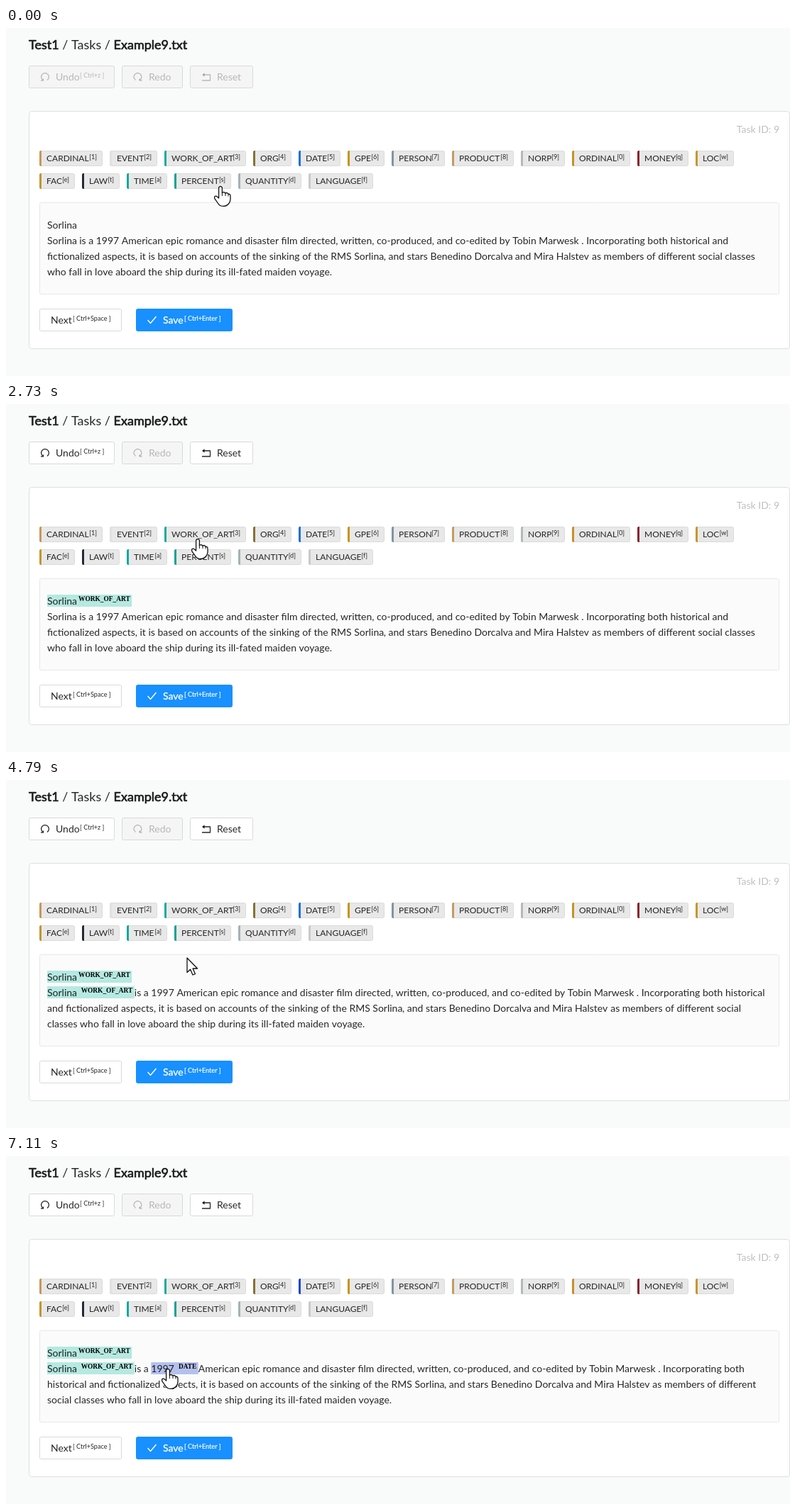
These frames come from a looping animation (1104 px wide and 491 px high, 7310 ms). An HTML page with a canvas:

```html
<!DOCTYPE html>
<html lang="en">
<head>
<meta charset="utf-8">
<title>Text annotation</title>
<style>
html, body { margin: 0; width: 100%; height: 100%; overflow: hidden; background: #f9fbfa; }
canvas { display: block; }
</style>
</head>
<body>
<canvas id="stage" width="1104" height="491"></canvas>
<script>
const ctx = document.getElementById('stage').getContext('2d');
const LOOP = 7310, FADE = 300;
const LATO = 'Lato, sans-serif';
const BODY = '14px ' + LATO, SUP = '9.1px ' + LATO;
const LABEL = 'bold 9.38px "Liberation Serif", serif';
const INK = 'rgba(0,0,0,.85)', FAINT = 'rgba(0,0,0,.25)', BLUE = '#1890ff';

// name, hotkey, box width, stripe colour
const TAGS = [[
  ['CARDINAL', '1', 89, '#c8975a'], ['EVENT', '2', 67, '#e0e2e1'],
  ['WORK_OF_ART', '3', 115, '#13ada0'], ['ORG', '4', 54, '#8a6f35'],
  ['DATE', '5', 59, '#1a72d2'], ['GPE', '6', 52, '#c49520'],
  ['PERSON', '7', 75, '#7f95a5'], ['PRODUCT', '8', 87, '#c69a60'],
  ['NORP', '9', 62, '#b3b9b7'], ['ORDINAL', '0', 82, '#c99127'],
  ['MONEY', 'q', 72, '#8c2430'], ['LOC', 'w', 54, '#c9972e']
], [
  ['FAC', 'e', 50, '#c3952e'], ['LAW', 't', 53, '#262a33'],
  ['TIME', 'a', 57, '#12a89f'], ['PERCENT', 's', 80, '#12a294'],
  ['QUANTITY', 'd', 89, '#9fb4b5'], ['LANGUAGE', 'f', 91, '#c5cbc8']
]];
const tagBoxes = TAGS.flatMap((row, r) => {
  let x = 47;
  return row.map(([name, key, w, color]) => {
    const box = { name, key, color, x, y: 173 + 32 * r, w, h: 22 };
    x += w + 10;
    return box;
  });
});

// each annotation: tag click, text selection, mark placed
const STEPS = [
  { tag: 'WORK_OF_ART', click: 700, select: 1840, mark: 1990, fill: '#b5e9e1' },
  { tag: 'WORK_OF_ART', click: 2960, select: 4030, mark: 4130, fill: '#b5e9e1' },
  { tag: 'DATE', click: 5200, select: 6250, mark: 6380, fill: '#b4c1ee' }
];
const ACTIVE = { WORK_OF_ART: '#12bfa9', DATE: '#1f50d6' };

// name and the room it takes on the line
const NAMES = {
  title: ['Sorlina', 41.6],
  director: ['Tobin Marwesk', 97],
  lead: ['Benedino Dorcalva', 115.8],
  star: ['Mira Halstev', 78.4]
};
const STORY = ('{title} is a 1997 American epic romance and disaster film directed, written, ' +
  'co-produced, and co-edited by {director}. Incorporating both historical and fictionalized ' +
  'aspects, it is based on accounts of the sinking of the RMS {title}, and stars {lead} and ' +
  '{star} as members of different social classes who fall in love aboard the ship during its ' +
  'ill-fated maiden voyage.').split(' ');

// time, x, y
const PATH = [
  [0, 302, 223], [290, 302, 223], [580, 272, 178], [860, 272, 178], [970, 212, 212],
  [1010, 171, 232], [1400, 72, 282], [1720, 79, 281], [2380, 79, 281], [2590, 200, 232],
  [2730, 270, 190], [2800, 272, 186], [3080, 272, 186], [3300, 187, 256], [3600, 80, 296],
  [3720, 73, 300], [4580, 73, 300], [4830, 290, 240], [5060, 436, 186], [5330, 436, 186],
  [5580, 327, 256], [5950, 222, 300], [6100, 217, 299], [6850, 217, 299], [7080, 228, 300],
  [7310, 228, 300]
];

const clamp = v => Math.max(0, Math.min(1, v));
const inside = (p, b) => p.x >= b.x && p.x < b.x + b.w && p.y >= b.y && p.y < b.y + b.h;

function widthOf(str, font) {
  ctx.font = font;
  return ctx.measureText(str).width;
}

// bold thickens the regular face and keeps its advance widths
function text(str, x, y, font = BODY, color = INK, bold = 0) {
  const w = widthOf(str, font);
  ctx.fillStyle = color;
  ctx.fillText(str, x, y);
  if (bold) {
    ctx.strokeStyle = color;
    ctx.lineWidth = bold;
    ctx.lineJoin = 'round';
    ctx.strokeText(str, x, y);
  }
  return x + w;
}

function panel(x, y, w, h, r, fill, stroke) {
  ctx.beginPath();
  ctx.roundRect(x + .5, y + .5, w - 1, h - 1, r);
  ctx.fillStyle = fill;
  ctx.fill();
  ctx.strokeStyle = stroke;
  ctx.lineWidth = 1;
  ctx.stroke();
}

function line(points, color, width) {
  ctx.beginPath();
  points.forEach(([x, y]) => ctx.lineTo(x, y));
  ctx.strokeStyle = color;
  ctx.lineWidth = width;
  ctx.stroke();
}

function turnIcon(x, y, side, color) {
  ctx.beginPath();
  ctx.arc(x, y - .5, 5.4, Math.PI * .68, Math.PI * 2.32);
  ctx.strokeStyle = color;
  ctx.lineWidth = 1.3;
  ctx.stroke();
  line([[x + side * 6, y + 4.6], [x + side * 2.6, y + 4.6], [x + side * 2.6, y + 2]], color, 1.3);
}

function resetIcon(x, y, color) {
  line([[x - 4, y - 3.5], [x + 5.5, y - 3.5], [x + 5.5, y + 4.5], [x - 6, y + 4.5]], color, 1.3);
  ctx.beginPath();
  ctx.moveTo(x - 6, y - 3.5);
  ctx.lineTo(x - 2.5, y - 6.2);
  ctx.lineTo(x - 2.5, y - .8);
  ctx.fillStyle = color;
  ctx.fill();
}

function toolbar(t) {
  const on = clamp((t - STEPS[0].mark) / FADE);
  const v = Math.round(245 + 10 * on);
  const fill = `rgb(${v},${v},${v})`, color = `rgba(0,0,0,${.25 + .6 * on})`;
  panel(32, 53, 121, 32, 2, fill, '#d9d9d9');
  panel(163, 53, 86, 32, 2, '#f5f5f5', '#d9d9d9');
  panel(259, 53, 89, 32, 2, fill, '#d9d9d9');
  turnIcon(55, 69.5, -1, color);
  turnIcon(185.5, 69.5, 1, FAINT);
  resetIcon(282, 69.5, color);
  text('[ Ctrl+z ]', text('Undo', 70, 74, BODY, color) + .4, 70, SUP, color);
  text('Redo', 201, 74, BODY, FAINT);
  text('Reset', 297, 74, BODY, color);
}

function heading() {
  const font = '18px ' + LATO;
  let x = text('Test1', 32, 30, font, INK, .7);
  x = text(' / Tasks / ', x, 30, font);
  text('Example9.txt', x, 30, font, INK, .7);
}

function glow(box, color, u) {
  if (u <= 0 || u >= 1) return;
  ctx.save();
  ctx.globalAlpha = .6 * (1 - u ** 3);
  ctx.shadowColor = color;
  ctx.shadowBlur = 6 * Math.min(1, u * 4);
  ctx.fillStyle = color;
  ctx.beginPath();
  ctx.roundRect(box.x, box.y, box.w, box.h, 2);
  ctx.fill();
  ctx.restore();
}

function drawTag(box, t) {
  const { name, key, x, y, w, h } = box;
  const stripe = name === 'DATE' && t >= STEPS[2].click ? '#1c46ce' : box.color;
  let level = 0;
  for (const s of STEPS) {
    if (s.tag !== name) continue;
    level = Math.max(level, clamp((t - s.click) / FADE) * (1 - clamp((t - s.mark) / FADE)));
    glow(box, ACTIVE[name], (t - s.click) / 410);
  }
  panel(x, y, w, h, 2, '#e8e8e8', '#dbdbdb');
  ctx.fillStyle = stripe;
  ctx.beginPath();
  ctx.roundRect(x, y, 3, h, [2, 0, 0, 2]);
  ctx.fill();
  if (level) {
    ctx.globalAlpha = level;
    ctx.fillStyle = ACTIVE[name];
    ctx.beginPath();
    ctx.roundRect(x, y, w, h, 2);
    ctx.fill();
    ctx.globalAlpha = 1;
  }
  const v = Math.round(38 + 217 * level), color = `rgb(${v},${v},${v})`;
  const bold = level > .5 ? .5 : 0, hint = `[${key}]`;
  text(name, x + 10, y + 15, '12px ' + LATO, color, bold);
  text(hint, x + w - 8 - widthOf(hint, SUP), y + 11.5, SUP, color, bold / 2);
}

// draws one word, with its selection or mark; returns the right edge and the mark box
function drawWord(word, x, y, step, t, spaced) {
  const slot = /^\{(\w+)\}(.*)$/.exec(word);
  const [name, nameW] = slot ? NAMES[slot[1]] : ['', 0];
  const rest = slot ? slot[2] : word;
  const wordW = nameW + widthOf(rest, BODY);
  const tailW = wordW + (spaced ? widthOf(' ', BODY) : 0);
  const marked = step && t >= step.mark;
  const selected = step && !marked && t >= step.select;
  let box = null, end = x + wordW;
  if (marked) {
    end = x + tailW + 5 + widthOf(step.tag, LABEL);
    box = { x, y: y - 14, w: end - x, h: 17 };
    ctx.fillStyle = step.fill;
    ctx.fillRect(x, box.y, box.w, box.h);
    text(step.tag, x + tailW + 2.5, y - 5, LABEL, '#000');
  } else if (selected) {
    ctx.fillStyle = BLUE;
    ctx.fillRect(x, y - 16, tailW, 22);
  }
  const color = selected ? '#fff' : INK;
  if (name) text(name, x, y, BODY, color);
  if (rest) text(rest, x + nameW, y, BODY, color);
  return { end, box, wordW };
}

function story(t) {
  const left = 58, right = 1078, space = widthOf(' ', BODY);
  const marks = [drawWord('{title}', left, 283, STEPS[0], t, false).box];
  let x = left, y = 305;
  STORY.forEach((word, i) => {
    const step = i === 0 ? STEPS[1] : i === 3 ? STEPS[2] : null;
    const slot = /^\{(\w+)\}(.*)$/.exec(word);
    const w = slot ? NAMES[slot[1]][1] + widthOf(slot[2], BODY) : widthOf(word, BODY);
    if (x + w > right) { x = left; y += 22; }
    const { end, box } = drawWord(word, x, y, step, t, true);
    if (box) marks.push(box);
    x = box ? end : end + space;
  });
  return marks.filter(Boolean);
}

function footer() {
  panel(47, 396, 116, 32, 2, '#fff', '#d9d9d9');
  text('[ Ctrl+Space ]', text('Next', 63, 417) + 1.2, 413, SUP);
  panel(183, 396, 136, 32, 2, BLUE, BLUE);
  line([[199.5, 412], [203.5, 416.5], [211.5, 407]], '#fff', 1.4);
  text('[ Ctrl+Enter ]', text('Save', 221, 417, BODY, '#fff', .3) + 1.2, 413, SUP, '#fff', .2);
}

function pointerAt(t) {
  let i = 0;
  while (i < PATH.length - 2 && t >= PATH[i + 1][0]) i++;
  const speed = (k, c) => {
    const a = PATH[k - 1], p = PATH[k], b = PATH[k + 1];
    if (!a || !b || a[c] === p[c] || b[c] === p[c]) return 0;
    return (b[c] - a[c]) / (b[0] - a[0]);
  };
  const p = PATH[i], q = PATH[i + 1], d = q[0] - p[0], u = (t - p[0]) / d;
  const at = c => {
    const ease = u * u * (3 - 2 * u);
    return p[c] + (q[c] - p[c]) * ease +
      d * (speed(i, c) * u * (1 - u) ** 2 - speed(i + 1, c) * u * u * (1 - u));
  };
  return { x: at(1), y: at(2) };
}

const ARROW = new Path2D('M0 0V20.5L4.6 16.2L8 24L11.4 22.6L8.1 15H14.6Z');
const HAND = new Path2D('M-2.4 2.2Q0-1.6 2.4 2.2V9.5Q5 7.3 7 10.2Q9.6 8.4 11 11.3Q14 10.8 14 14' +
  'V19Q13.6 23 11.5 25Q9 28.4 4 28.4Q-1 28.4-3 25L-8.2 17.6Q-9.2 13.6-5.6 14.3L-2.4 17Z');

function pointer(t, marks) {
  const p = pointerAt(t);
  const active = STEPS.find(s => t >= s.click && t < s.mark);
  const tag = tagBoxes.find(b => inside(p, b));
  const hand = tag ? !active || active.tag === tag.name : marks.some(b => inside(p, b));
  const beam = inside(p, { x: 58, y: 269, w: 1020, h: 84 });
  ctx.save();
  ctx.translate(Math.round(p.x), Math.round(p.y));
  ctx.lineJoin = 'round';
  if (!hand && beam) {
    ctx.globalCompositeOperation = 'difference';
    ctx.fillStyle = '#fff';
    ctx.fillRect(0, -7, 1, 15);
    for (const y of [-8, 8]) {
      ctx.fillRect(-3, y, 3, 1);
      ctx.fillRect(1, y, 3, 1);
    }
  } else {
    const shape = hand ? HAND : ARROW;
    ctx.fillStyle = '#fff';
    ctx.strokeStyle = '#111';
    ctx.lineWidth = 1.3;
    ctx.fill(shape);
    ctx.stroke(shape);
    if (hand) {
      line([[2.4, 9], [2.4, 14]], '#111', 1);
      line([[7, 10.2], [7, 14]], '#111', 1);
      line([[11, 11.3], [11, 14.5]], '#111', 1);
    }
  }
  ctx.restore();
}

function draw(now) {
  const t = now % LOOP;
  ctx.fillStyle = '#f9fbfa';
  ctx.fillRect(0, 0, 1104, 491);
  heading();
  toolbar(t);
  panel(32, 117, 1072, 336, 4, '#fff', '#dde0df');
  const id = 'Task ID: 9';
  text(id, 1089 - widthOf(id, BODY), 148, BODY, '#bfbfbf');
  tagBoxes.forEach(box => drawTag(box, t));
  panel(47, 246, 1042, 130, 2, '#fbfbfb', '#e8e8e8');
  const marks = story(t);
  footer();
  pointer(t, marks);
}

function tick() {
  draw(performance.now());
  requestAnimationFrame(tick);
}
tick();
</script>
</body>
</html>
```
